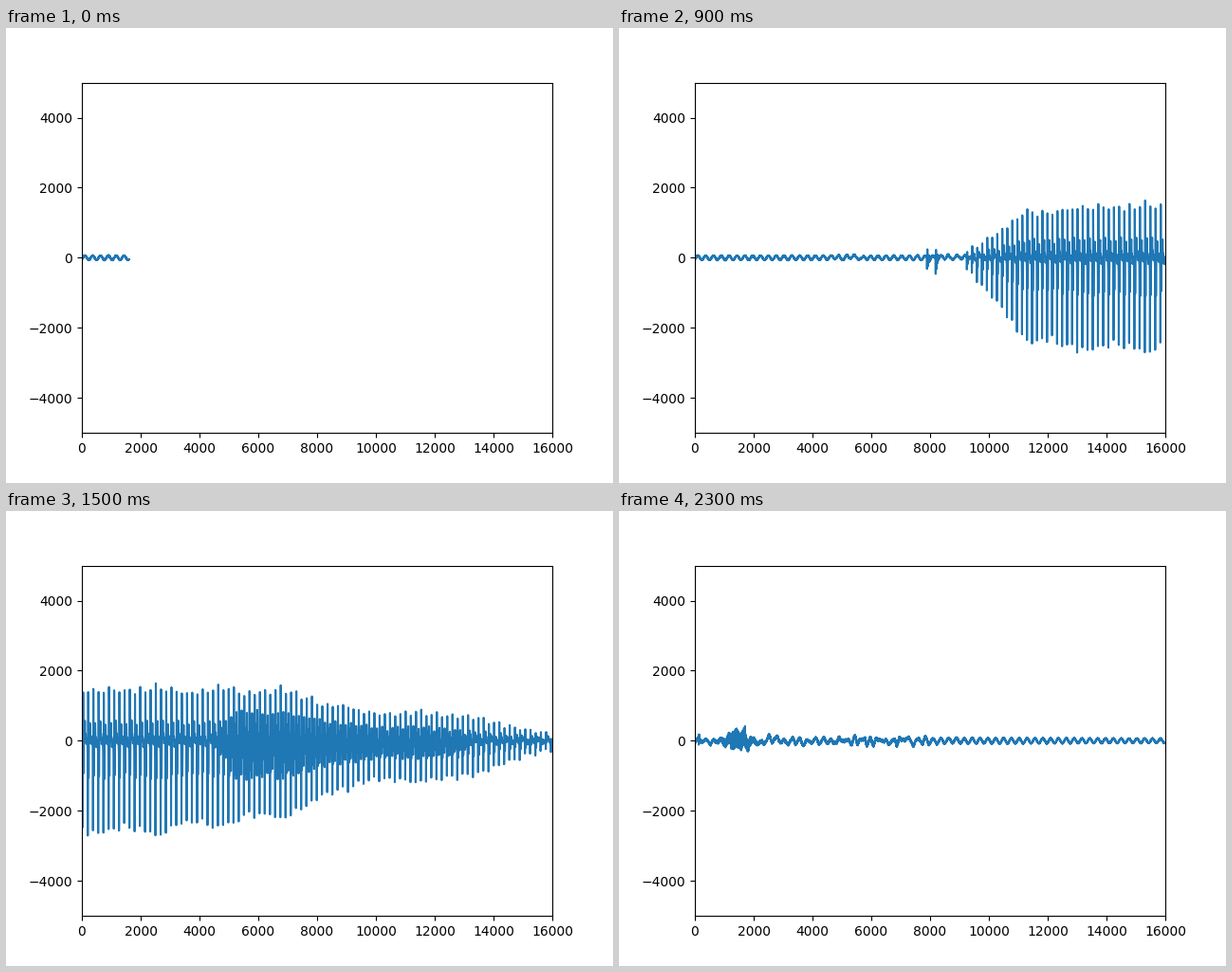
A matplotlib script that plays this animation: 640x480 px, repeating every 2400 ms.

```python
import numpy as np
import matplotlib.pyplot as plt
from matplotlib.animation import FuncAnimation

CHUNK, WINDOW, TOTAL = 1600, 16000, 48000
FRAMES, INTERVAL = 24, 100
STEP = 1.25  # audio chunks per drawn frame
RATE = 16000

rng = np.random.default_rng(4)
x = np.arange(TOTAL)


def swell(at, centre, width):
    return np.exp(-0.5 * ((at - centre) / width) ** 2)


def loudness(at):
    """Depth of a voice pulse: attack, hold, fall, soft ending."""
    base = np.interp(at, [12400, 14600, 16200, 18700, 23000, 25500, 28700, 32300],
                     [300, 2420, 2600, 2600, 2130, 1170, 1120, 130])
    return base * (1 + 0.05 * np.cos(2 * np.pi * (at - 16400) / 2200))


def ring(t, decay):
    body = -np.cos(2 * np.pi * t / 28) * np.exp(-t / decay)
    tail = 0.15 * np.sin(2 * np.pi * t / 44) * np.exp(-t / 90)
    echo = 0.3 * swell(t, 75, 6)
    return np.where(t < 0, -np.exp(np.minimum(t, 0) / 3), body + tail + echo)


def add_pulse(y, at, low, high, decay=23.4):
    lo, hi = int(at) - 15, int(at) + 400
    s = ring(x[lo:hi] - at, decay)
    y[lo:hi] += low * np.minimum(s, 0) + high / s.max() * np.maximum(s, 0)


def add_voice(y):
    at = 12450
    while at < 32300:
        period = np.interp(at, [16050, 16150], [170.5, 177])
        low = loudness(at) * rng.uniform(0.95, 1.02)
        high = low * np.interp(at, [16000, 26000], [0.56, 0.68])
        add_pulse(y, at, low, high * rng.uniform(0.9, 1))

        # a weaker beat between pulses fills in the second half
        share = np.interp(at, [20300, 21200, 28500, 29300], [0, 0.55, 0.45, 0.1])
        half = low * share * rng.uniform(0.8, 1)
        add_pulse(y, at + 0.5 * period, half, 0.6 * half)
        at += period


def make_signal():
    hum = 58 + 14 * swell(x, 41000, 3500)
    y = hum * np.sin(2 * np.pi * 60 * (x - 34) / RATE)

    lumps = np.convolve(rng.standard_normal(TOTAL),
                        swell(np.arange(-90, 91), 0, 28), "same")
    y += lumps / lumps.std() * (
        28 * swell(x, 8600, 450) + 28 * swell(x, 12000, 400)
        + 40 * swell(x, 34500, 2000) + 70 * swell(x, 38700, 1000))
    y += rng.standard_normal(TOTAL) * (
        7 + 9 * swell(x, 36000, 3500) + 105 * swell(x, 33480, 300))

    add_pulse(y, 11095, 320, 250, 50)
    add_pulse(y, 11388, 430, 260, 50)
    add_voice(y)
    return y


signal = make_signal()

fig, ax = plt.subplots(figsize=(6.4, 4.8), dpi=100)
ax.set_xlim(0, WINDOW)
ax.set_ylim(-5000, 5000)
line, = ax.plot([], [], color="#1f77b4", lw=1.5)


def update(i):
    end = CHUNK * (int(i * STEP + 0.5) + 1)
    part = signal[max(0, end - WINDOW):end]
    line.set_data(x[:len(part)], part)
    return line,


anim = FuncAnimation(fig, update, frames=FRAMES, interval=INTERVAL, repeat=True)
plt.show()
```
